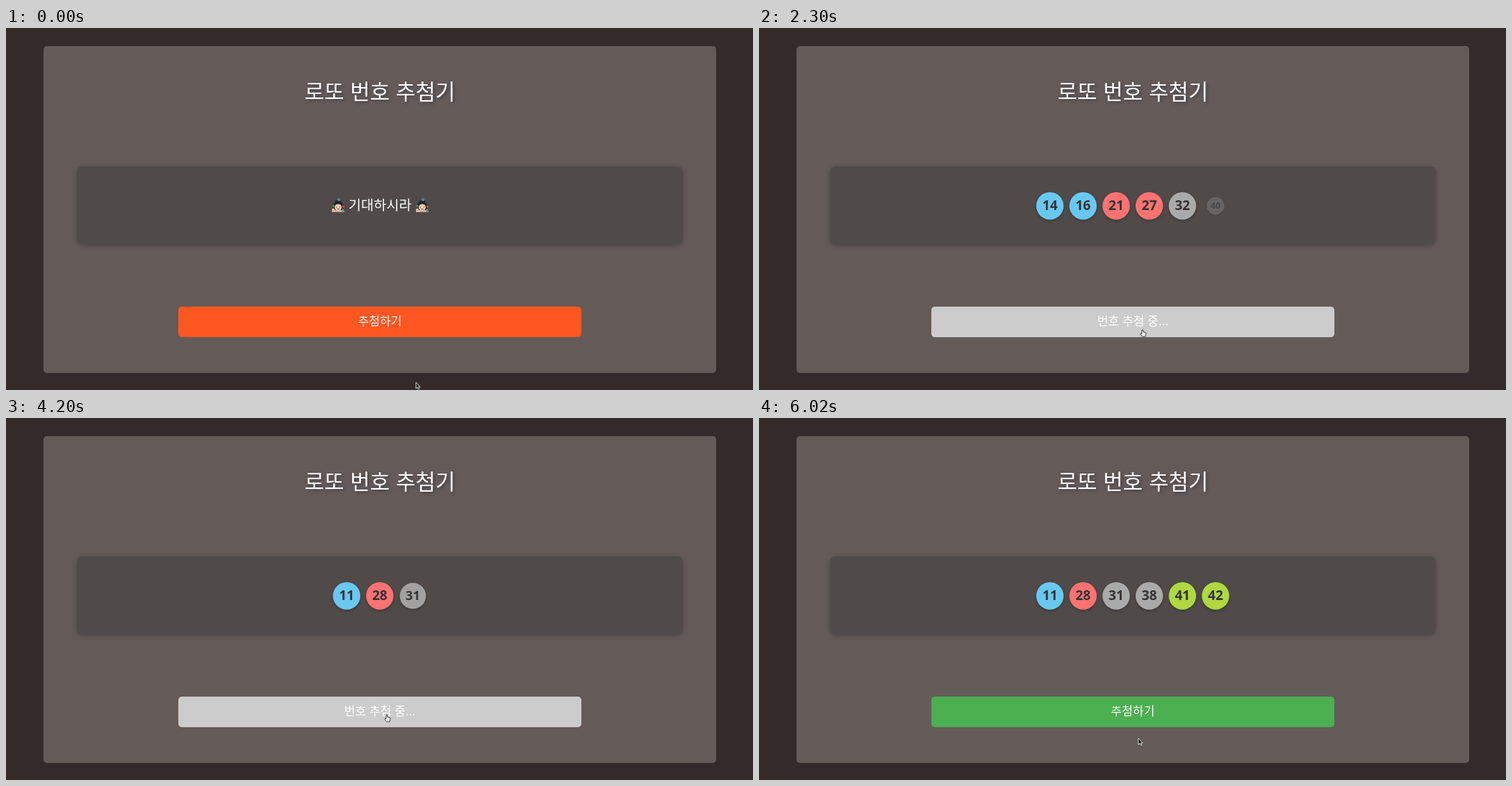
These frames come from a looping animation (1075x521 px, 6140 ms). An HTML page:

```html
<!DOCTYPE html>
<html lang="ko">
<head>
<meta charset="utf-8">
<title>로또 번호 추첨기</title>
<style>
  html, body { margin: 0; width: 100%; height: 100%; overflow: hidden; background: #352a2a; }
  svg { display: block; width: 1075px; height: 521px; }
  text { font-family: "Noto Sans CJK KR", "Noto Sans CJK", sans-serif; font-weight: 500; fill: #fff; text-anchor: middle; }
  .title { font-size: 31px; filter: drop-shadow(2px 2px 2px rgba(0, 0, 0, .3)); }
  .tray { fill: #504a49; filter: drop-shadow(0 2px 3px rgba(0, 0, 0, .25)); }
  .message text { font-size: 19.8px; }
  #label { font-size: 17.1px; }
  .ball { filter: drop-shadow(0 2px 2px rgba(0, 0, 0, .22)); }
  .ball text { font: 600 19.2px "Noto Sans", "Open Sans", sans-serif; fill: #333; }
</style>
</head>
<body>
<svg viewBox="0 0 1075 521">
  <defs>
    <g id="face">
      <path d="M-9 10Q-8 5 -4 5H4Q8 5 9 10Z" fill="#d9a79a"/>
      <path d="M-6 -1H6V7H-6Z" fill="#2b2524"/>
      <ellipse cy="3" rx="5" ry="5" fill="#f5cdb6"/>
      <path d="M-9 0Q-5 -2 -4 -6Q0 -9 4 -6Q5 -2 9 0Q0 -3 -9 0Z" fill="#252323"/>
      <circle cx="1" cy="-8" r="2.2" fill="#4a83cb"/>
      <circle cx="-7" cy="1" r="1.5" fill="#3ca35a"/>
      <circle cx="7.5" cy="2" r="1.6" fill="#d8433f"/>
      <circle cx="-7" cy="7" r="2.2" fill="#efbda7"/>
      <circle cx="7" cy="8" r="1.7" fill="#4ba866"/>
      <path d="M-2.5 2V3.4M2.5 2V3.4M-1.5 5.5H1.5" stroke="#5a3430" fill="none"/>
    </g>
  </defs>
  <rect width="1075" height="521" fill="#352a2a"/>
  <rect x="54" y="26" width="968" height="470.5" rx="5" fill="#645b59"/>
  <text class="title" x="538" y="102.5">로또 번호 추첨기</text>
  <rect class="tray" x="102" y="199" width="872" height="112" rx="8"/>
  <g class="message" id="message">
    <use href="#face" x="478" y="255"/>
    <text x="538.3" y="262">기대하시라</text>
    <use href="#face" x="599" y="255"/>
  </g>
  <g id="row"></g>
  <rect id="button" x="248" y="401" width="580" height="44" rx="5"/>
  <text id="label" x="538" y="427.5"></text>
  <path id="arrow" d="M0 0V9L2 7.2L3.3 10L4.8 9.4L3.5 6.6H6Z" fill="#161313" stroke="#fff" stroke-width=".8"/>
  <path id="hand" d="M-1 .8Q0 -.4 1 .8V3.6L4 4.2Q5.2 4.6 5 6L4.2 10H-.4L-3 6.6Q-3.2 5 -1 6Z"
        fill="#fff" stroke="#222" stroke-width=".9"/>
</svg>
<script>
const LOOP = 6140, STEP = 326, POP = 400, FADE = 200;
const GAP = 47.67, CENTER = 537.85;
const ORANGE = [255, 87, 34], HOVER = [230, 74, 25], GREY = [204, 204, 204], GREEN = [76, 175, 80];
const ballColors = ['#fbc400', '#69c8f2', '#ff7272', '#aaaaaa', '#b0d840'];

const draws = [
  { start: 595, numbers: [14, 16, 21, 27, 32, 40] },
  { start: 3295, numbers: [11, 28, 31, 38, 41, 42] }
];
const drawLength = 6 * STEP;

// Button colour changes: [time, colour]
const fades = [[-FADE, ORANGE], [240, HOVER]];
for (const { start } of draws) fades.push([start, GREY], [start + drawLength, GREEN]);

// Pointer hotspot: [time, x, y]
const path = [
  [0, 590, 510], [60, 590, 510], [240, 566, 452], [400, 550, 432],
  [1500, 550, 432], [2000, 552, 434], [2400, 552, 434], [2650, 551, 430],
  [2800, 551, 430], [3000, 548, 427], [5640, 548, 427], [5950, 546, 461]
];

const $ = id => document.getElementById(id);
const clamp = v => Math.min(1, Math.max(0, v));
const mix = (a, b, k) => a + (b - a) * k;

// Same curve as CSS "ease"
function ease(x) {
  x = clamp(x);
  if (x === 0 || x === 1) return x;
  let lo = 0, hi = 1, s = .5;
  for (let i = 0; i < 20; i++) {
    s = (lo + hi) / 2;
    if (.75 * s * (1 - s) + s ** 3 < x) lo = s; else hi = s;
  }
  return .3 * s * (1 - s) ** 2 + 3 * s * s * (1 - s) + s ** 3;
}

function makeBall(n) {
  const color = ballColors[Math.floor((n - 1) / 10)];
  $('row').insertAdjacentHTML('beforeend',
    `<g class="ball"><circle r="19.7" fill="${color}"/><text y="6">${n}</text></g>`);
  return $('row').lastElementChild;
}
for (const draw of draws) draw.balls = draw.numbers.map(makeBall);

function paintBalls(t) {
  const current = draws.findLast(d => t >= d.start);
  $('message').style.display = current ? 'none' : '';
  for (const draw of draws) {
    const age = t - draw.start;
    const count = draw === current ? Math.min(6, Math.floor(age / STEP) + 1) : 0;
    draw.balls.forEach((ball, i) => {
      ball.style.display = i < count ? '' : 'none';
      if (i >= count) return;
      const k = ease((age - i * STEP) / POP);
      const x = CENTER + (i - (count - 1) / 2) * GAP;
      ball.setAttribute('transform', `translate(${x} 256) scale(${mix(.5, 1, k)})`);
      ball.setAttribute('opacity', k);
    });
  }
}

function paintButton(t) {
  const i = fades.findLastIndex(f => t >= f[0]);
  const [time, color] = fades[i];
  const from = i ? fades[i - 1][1] : color;
  const k = ease((t - time) / FADE);
  $('button').setAttribute('fill', `rgb(${color.map((c, j) => Math.round(mix(from[j], c, k)))})`);
  const busy = draws.some(d => t >= d.start && t < d.start + drawLength);
  const label = busy ? '번호 추첨 중...' : '추첨하기';
  if ($('label').textContent !== label) $('label').textContent = label;
}

function paintPointer(t) {
  const i = path.findLastIndex(p => t >= p[0]);
  const a = path[i], b = path[i + 1] || a;
  const k = a === b ? 0 : (t - a[0]) / (b[0] - a[0]);
  const x = mix(a[1], b[1], k), y = mix(a[2], b[2], k);
  const over = y >= 401 && y <= 445;
  for (const id of ['arrow', 'hand']) {
    $(id).style.display = (id === 'hand') === over ? '' : 'none';
    $(id).setAttribute('transform', `translate(${x} ${y})`);
  }
}

const begin = performance.now();
function frame() {
  const t = (performance.now() - begin) % LOOP;
  paintBalls(t);
  paintButton(t);
  paintPointer(t);
  requestAnimationFrame(frame);
}
frame();
</script>
</body>
</html>
```
